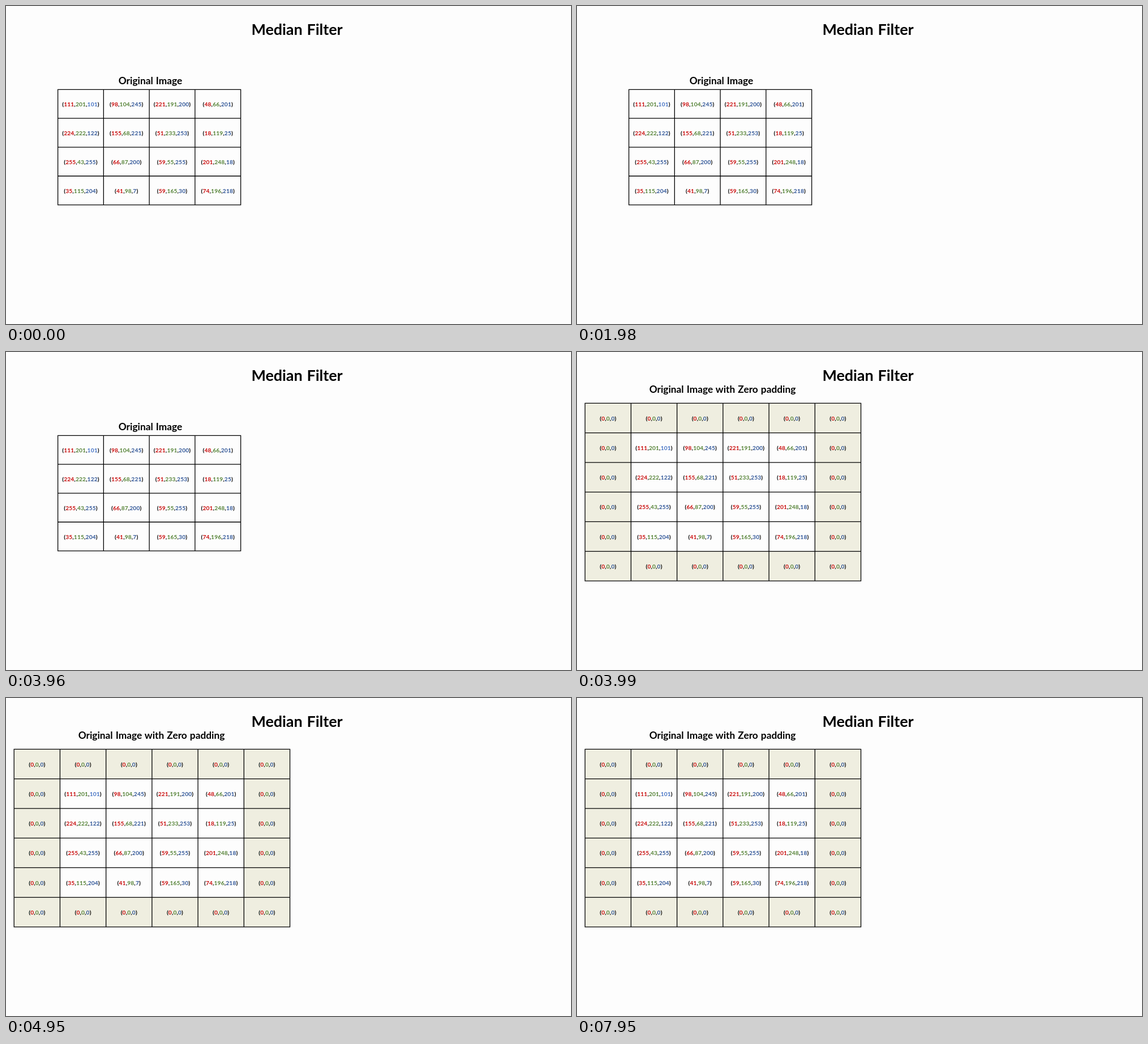
Write an HTML page that moves like this. It is 998 px wide and 561 px high and loops after 8 s.

```html
<!DOCTYPE html>
<html lang="en">
<head>
<meta charset="utf-8">
<title>Median Filter</title>
<style>
  html, body { margin: 0; width: 100%; height: 100%; overflow: hidden; background: #fdfdfd; }
  svg { display: block; width: 998px; height: 561px; }
  text { font-family: Lato, "Open Sans", sans-serif; font-weight: 700; text-anchor: middle; fill: #000; }
  .title { font-size: 26.9px; word-spacing: .05em; }
  .caption { font-size: 17.3px; word-spacing: .05em; }
  .cell { font-size: 10.2px; letter-spacing: .15px; }
  .r { fill: #c90a0a; }
  .g { fill: #548235; }
  .b { fill: #2f5597; }
  .light .b { fill: #4472c4; }
  .pad { fill: #efeee0; }
  .lines { fill: none; stroke: #000; stroke-width: 1.3; stroke-linecap: square; }
</style>
</head>
<body>
<svg id="stage" viewBox="0 0 998 561">
  <text class="title" x="514" y="51">Median Filter</text>
</svg>
<script>
const NS = "http://www.w3.org/2000/svg";
const LOOP = 8000, PADDING_AT = 3990;
const stage = document.getElementById("stage");

const pixels = [
  "111,201,101 98,104,245 221,191,200 48,66,201",
  "224,222,122 155,68,221 51,233,253 18,119,25",
  "255,43,255 66,87,200 59,55,255 201,248,18",
  "35,115,204 41,98,7 59,165,30 74,196,218"
].map(row => row.split(" "));

const zeros = Array(6).fill("0,0,0");
const padded = [zeros, ...pixels.map(row => ["0,0,0", ...row, "0,0,0"]), zeros];

function add(parent, tag, attrs, text = "") {
  const el = document.createElementNS(NS, tag);
  for (const key in attrs) el.setAttribute(key, attrs[key]);
  el.textContent = text;
  parent.appendChild(el);
  return el;
}

function addTriple(parent, value, x, y) {
  const light = value === "111,201,101" ? " light" : "";
  const label = add(parent, "text", { class: "cell" + light, x, y });
  label.append("(");
  value.split(",").forEach((part, i) => {
    if (i) label.append(",");
    add(label, "tspan", { class: "rgb"[i] }, part);
  });
  label.append(")");
}

function addGrid({ rows, x, y, w, h, caption, cx, cy, border }) {
  const group = add(stage, "g", {});
  const n = rows.length, right = x + n * w, bottom = y + n * h;
  add(group, "text", { class: "caption", x: cx, y: cy }, caption);
  if (border) {
    add(group, "rect", { class: "pad", x, y, width: n * w, height: n * h });
    add(group, "rect", { x: x + w, y: y + h, width: (n - 2) * w, height: (n - 2) * h, fill: "#fdfdfd" });
  }
  let path = "";
  for (let i = 0; i <= n; i++) {
    path += `M${x + i * w} ${y}V${bottom}M${x} ${y + i * h}H${right}`;
  }
  add(group, "path", { class: "lines", d: path });
  rows.forEach((row, r) => row.forEach((value, c) =>
    addTriple(group, value, x + (c + .5) * w, y + (r + .5) * h + 4.1)));
  return group;
}

const plainGrid = addGrid({
  rows: pixels, x: 91.6, y: 147.3, w: 80.75, h: 50.9,
  caption: "Original Image", cx: 255, cy: 138
});
const paddedGrid = addGrid({
  rows: padded, x: 14.2, y: 90.3, w: 81.22, h: 52.25,
  caption: "Original Image with Zero padding", cx: 257, cy: 72, border: true
});

function draw(t) {
  const isPadded = t >= PADDING_AT;
  plainGrid.setAttribute("visibility", isPadded ? "hidden" : "visible");
  paddedGrid.setAttribute("visibility", isPadded ? "visible" : "hidden");
}

const start = performance.now();
function tick() {
  draw((performance.now() - start) % LOOP);
  requestAnimationFrame(tick);
}
draw(0);
requestAnimationFrame(tick);
</script>
</body>
</html>
```
